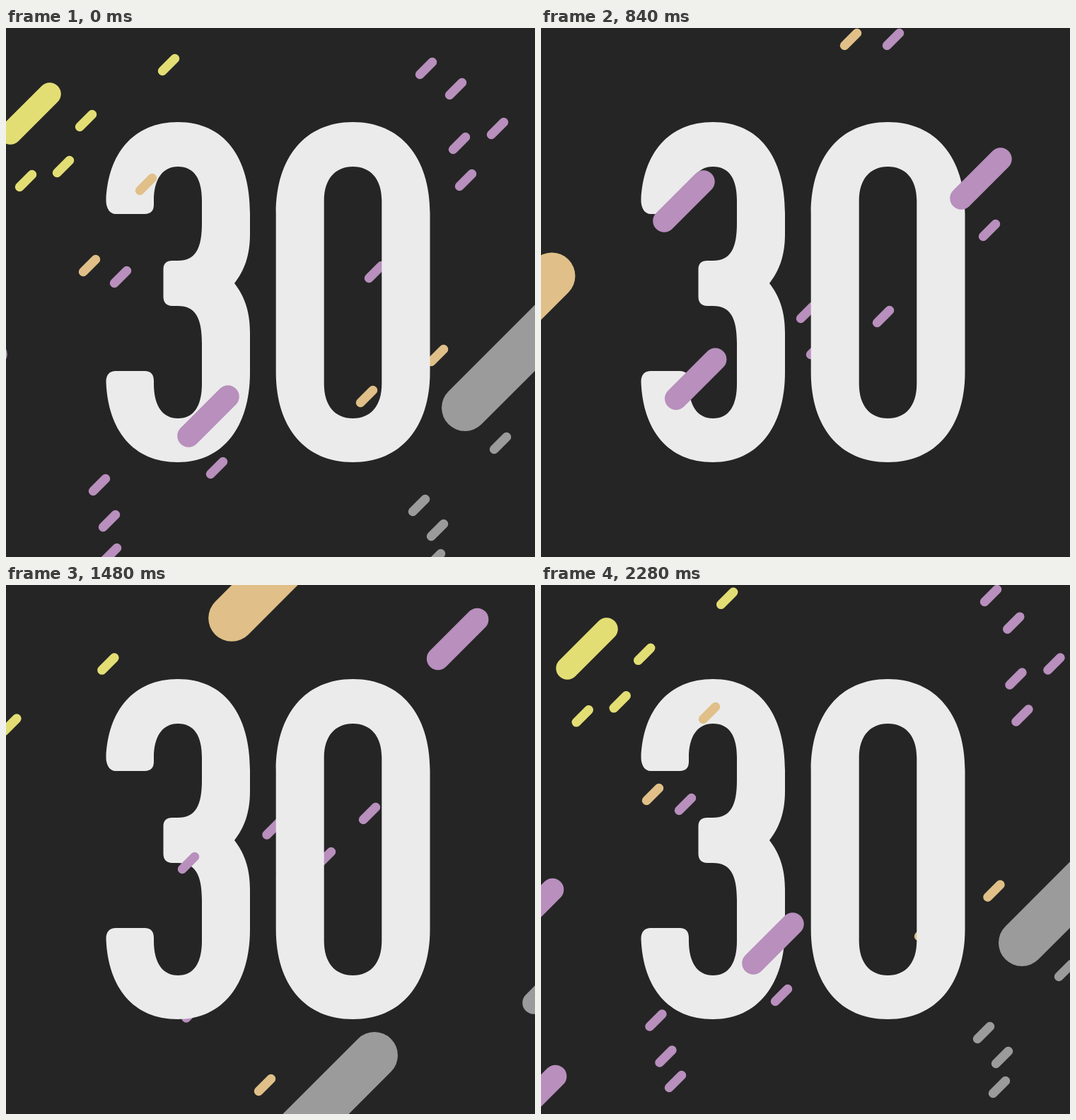
An HTML page with a canvas for the animation above (2.32 s loop, 748 px wide and 748 px high).

```html
<!DOCTYPE html>
<html lang="en">
<head>
<meta charset="utf-8">
<title>30 with confetti</title>
<style>
html, body { margin: 0; height: 100%; overflow: hidden; background: #252525; }
canvas { display: block; }
</style>
</head>
<body>
<canvas id="stage" width="748" height="748"></canvas>
<script>
const ctx = document.getElementById('stage').getContext('2d');
const STEP = 40, STEPS = 29;
const YELLOW = '#e3de74', TAN = '#e0c088', PURPLE = '#b88fbd', GRAY = '#9b9b9b';

// half: half the span between the two round ends, along each axis
const SMALL = { width: 13, half: 8.75 };
const MEDIUM = { width: 32, half: 27.75 };
const LARGE = { width: 66, half: 60 };

// Every dash drifts down-left at its swarm's speed (pixels per step on each axis)
// and returns after one loop. Points are centres at the start of the loop.
const swarms = [
  { size: SMALL, color: YELLOW, speed: 30.7, points: [[81, 196], [28, 216], [252, -48]] },
  { size: SMALL, color: YELLOW, speed: 33.2, points: [[230, 52], [113, 131], [410, -154]] },
  { size: SMALL, color: TAN, speed: 30.5, points: [[610, 463]] },
  { size: SMALL, color: TAN, speed: 33, points: [[510, 521]] },
  { size: SMALL, color: PURPLE, speed: 30.5,
    points: [[641, 163], [695, 142], [650, 215], [132, 646], [146, 697]] },
  { size: SMALL, color: PURPLE, speed: 32.3, points: [[636, 86], [522, 345]] },
  { size: SMALL, color: TAN, speed: 40, points: [[198, 221], [118, 336]] },
  { size: SMALL, color: PURPLE, speed: 42,
    points: [[594, 57], [162, 352], [298, 622], [148, 744], [850, -13]] },
  { size: SMALL, color: GRAY, speed: 42, points: [[699, 587], [584, 675], [610, 710], [606, 752]] },
  { size: MEDIUM, color: YELLOW, speed: 31, points: [[34, 121]] },
  { size: MEDIUM, color: PURPLE, speed: 30.5, points: [[-42, 489]] },
  { size: MEDIUM, color: PURPLE, speed: 32.3, points: [[897, -182]] },
  { size: MEDIUM, color: PURPLE, speed: 42, points: [[286, 549]] },
  { size: MEDIUM, color: GRAY, speed: 31, points: [[1022, 315]] },
  { size: LARGE, color: GRAY, speed: 31, points: [[709, 477]] },
  { size: LARGE, color: TAN, speed: 32.6, points: [[640, -274]] }
];

// Small slow dashes are far away and pass behind the digits
const isFar = swarm => swarm.size === SMALL && swarm.speed < 40;
const far = swarms.filter(isFar);
const near = swarms.filter(swarm => !isFar(swarm));

const three = new Path2D(`M141.5 244 C144 178 180 133 243 133 C309 133 345 183 345 262 V291
  C345 322 337 343 323 361 C337 379 345 400 345 431 V487 C345 565 306 614 243 614
  C180 614 144 569 141.5 500 C141.5 490 147 485 155 485 H196 C205 485 209 490 209 499 V503
  C209 535 222 552 243 552 C266 552 277 534 277 503 V446 C277 410 268 393 243 393 H235
  C227 393 222.5 388 222.5 380 V341 C222.5 333 227 329 235 329 H243 C268 329 277 312 277 276 V244
  C277 213 266 196 243 196 C222 196 209 213 209 244 V250 C209 258 205 263 196 263 H155
  C147 263 141.5 255 141.5 244Z`);
const zero = new Path2D(`M381.7 262 C381.7 183 423 133 490.5 133 C558 133 599.5 183 599.5 262 V487
  C599.5 565 558 614 490.5 614 C423 614 381.7 565 381.7 487Z
  M449.7 244 C449.7 213 466 196 490.5 196 C515 196 531.3 213 531.3 244 V503
  C531.3 535 515 552 490.5 552 C466 552 449.7 535 449.7 503Z`);

function drawSwarm({ size, color, speed, points }, step) {
  ctx.strokeStyle = color;
  ctx.lineWidth = size.width;
  ctx.beginPath();
  for (const [x, y] of points) {
    // this pass on its way out, and the next one coming in
    for (const n of [step, step - STEPS]) {
      const cx = x - speed * n, cy = y + speed * n;
      ctx.moveTo(cx - size.half, cy + size.half);
      ctx.lineTo(cx + size.half, cy - size.half);
    }
  }
  ctx.stroke();
}

function draw(time) {
  const step = Math.floor(time / STEP) % STEPS;
  ctx.fillStyle = '#252525';
  ctx.fillRect(0, 0, 748, 748);
  ctx.lineCap = 'round';
  far.forEach(swarm => drawSwarm(swarm, step));
  ctx.fillStyle = '#ebebeb';
  ctx.fill(three);
  ctx.fill(zero, 'evenodd');
  near.forEach(swarm => drawSwarm(swarm, step));
}

let start;
function tick(now) {
  start ??= now;
  draw(now - start);
  requestAnimationFrame(tick);
}
draw(0);
requestAnimationFrame(tick);
</script>
</body>
</html>
```
